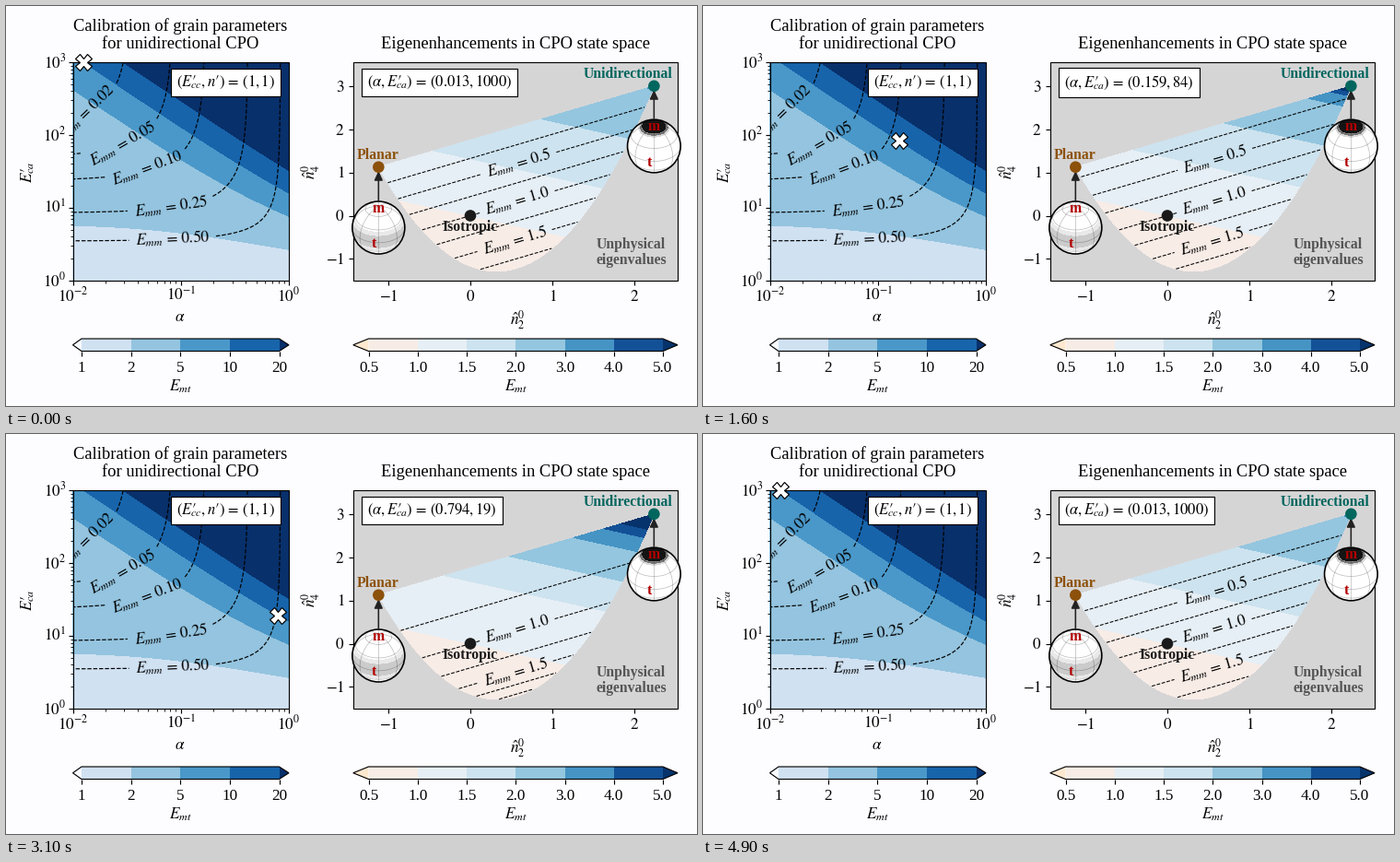
Write a matplotlib script that moves like this. It is 750 by 434 pixels and loops after 5 s.

```python
import numpy as np
import matplotlib.pyplot as plt
from matplotlib.animation import FuncAnimation
from matplotlib.patches import Circle, Polygon, Rectangle

W, H, DPI = 750, 434, 100
PT = 72 / DPI
FS, TITLE, BOLD, INFO = 17.1 * PT, 18.55 * PT, 15.7 * PT, 16.5 * PT
plt.rcParams.update({
    "font.family": "Liberation Serif", "mathtext.fontset": "stix",
    "font.size": FS, "axes.unicode_minus": True,
})

fig = plt.figure(figsize=(W / DPI, H / DPI), dpi=DPI, facecolor="#fdfcfe")
ax = fig.add_axes([0, 0, 1, 1])
ax.set_axis_off()

TOP, BOT = 61, 298
L0, L1 = 72.5, 307
R0, R1 = 376.8, 729
BLUES = ["#f7fbff", "#d0e1f2", "#94c4df", "#4a98c9", "#1764ab", "#08306b"]
STATE = ["#fde8cf", "#f8ece6", "#e6eff5", "#cde3ef", "#94c6df", "#4594c4",
         "#135197", "#06336b"]
EQ = r"\,=\,"
# Full-size prime set above a two-letter subscript.
PRIME = "\\hspace{-0.86}\u2032\\hspace{0.45}"


# ---------- model ----------
def enhancement(q, alpha, e_ca):
    """Mixed Sachs-Taylor enhancement for a mode with basal-shear share q."""
    k = 1 / e_ca - 1
    sachs = (1 + (e_ca - 1) * q) / (1 + 0.4 * (e_ca - 1))
    taylor = (1 + 0.4 * k) / (1 + k * q)
    return (1 - alpha) * sachs + alpha * taylor


def grain_px(log_a, log_e):
    return L0 + (log_a + 2) / 2 * (L1 - L0), BOT - log_e / 3 * (BOT - TOP)


def state_px(n2, n4):
    return 504 + 89.15 * n2, 227.5 - 46.9 * n4


def moments_px(x2, x4):
    """Pixel position of a state with <cos^2> = x2 and <cos^4> = x4."""
    n2 = np.sqrt(5) * (3 * x2 - 1) / 2
    return state_px(n2, 3 * (35 * x4 - 30 * x2 + 3) / 8)


# ---------- drawing helpers ----------
def put(x, y, s, size=FS, ha="center", va="baseline", **kw):
    return ax.text(x, y, s, fontsize=size, ha=ha, va=va, **kw)


def stroke(xs, ys, width=1.14, color="black", **kw):
    return ax.plot(xs, ys, color=color, lw=width * PT, **kw)[0]


def dashed(xs, ys, width, label=None, at=None, half=0, angle=None, clip=None):
    """Dashed line with an inline label centred nearest to `at`."""
    s = np.r_[0, np.cumsum(np.hypot(np.diff(xs), np.diff(ys)))]
    u = np.arange(0, s[-1], 0.5)
    xs, ys = np.interp(u, s, xs), np.interp(u, s, ys)
    parts, out = [slice(None)], []
    if label:
        c = int(np.argmin(np.hypot(xs - at[0], ys - at[1])))
        parts = [slice(0, max(0, c - 2 * half)), slice(c + 2 * half, None)]
        pos = (xs[c], ys[c]) if clip is None else at
        out.append(put(*pos, label, va="center", rotation=angle, zorder=3))
    for p in parts:
        if len(xs[p]) > 1:
            out.append(stroke(xs[p], ys[p], width, ls="--", zorder=2))
    if clip is not None:
        for artist in out:
            artist.set_clip_on(True)
            artist.set_clip_path(clip)
    return out


def frame_box(x0, x1):
    ax.add_patch(Rectangle((x0, TOP), x1 - x0, BOT - TOP, fc="none", ec="black",
                           lw=1.14 * PT, zorder=4))


def x_tick(x, y=BOT, length=5, width=1.14):
    stroke([x, x], [y, y + length], width, solid_capstyle="butt")


def y_tick(x, y, length=5, width=1.14):
    stroke([x - length, x], [y, y], width, solid_capstyle="butt")


def colour_bar(x0, a, b, x1, colors, labels):
    y0, y1 = 361, 374.5
    ym = (y0 + y1) / 2
    edges = np.linspace(a, b, len(labels))
    ax.add_patch(Polygon([(x0, ym), (a, y0), (a, y1)], fc=colors[0], lw=0))
    ax.add_patch(Polygon([(x1, ym), (b, y0), (b, y1)], fc=colors[-1], lw=0))
    for left, right, color in zip(edges, edges[1:], colors[1:]):
        ax.add_patch(Rectangle((left, y0), right - left, y1 - y0, fc=color, lw=0))
    ax.add_patch(Polygon([(x0, ym), (a, y0), (b, y0), (x1, ym), (b, y1), (a, y1)],
                         fc="none", ec="black", lw=1.14 * PT))
    for x, label in zip(edges, labels):
        x_tick(x, y1)
        put(x, 397, label)
    put((x0 + x1) / 2, 418, "$E_{mt}$")


def sphere(cx, cy, r, levels, colors, field):
    tilt = np.radians(35)
    sn, cs = np.sin(tilt), np.cos(tilt)
    g = np.linspace(-1.05, 1.05, 161)
    X, Y = np.meshgrid(g, g)
    sin_lat = Y * cs + np.sqrt(np.clip(1 - X**2 - Y**2, 0, 1)) * sn
    disk = Circle((cx, cy), r, fc="white", ec="none", zorder=5)
    ax.add_patch(disk)
    shade = ax.contourf(cx + r * X, cy - r * Y, field(sin_lat), levels=levels,
                        colors=colors, zorder=5.1)
    shade.set_clip_path(disk)

    def grid_line(lat, lon):
        depth = np.sin(lat) * sn + np.cos(lat) * np.cos(lon) * cs
        x = cx + r * np.cos(lat) * np.sin(lon)
        y = cy - r * (np.sin(lat) * cs - np.cos(lat) * np.cos(lon) * sn)
        stroke(np.where(depth > 0, x, np.nan), y, 0.75, alpha=0.25, zorder=5.2)

    turn = np.linspace(-np.pi, np.pi, 181)
    for lat in np.radians([-30, 0, 30, 60]):
        grid_line(np.full_like(turn, lat), turn)
    for lon in np.radians(np.arange(0, 360, 45)):
        grid_line(turn / 2, np.full_like(turn, lon))
    ax.add_patch(Circle((cx, cy), r, fc="none", ec="black", lw=1.6 * PT, zorder=5.3))
    for dx, dy, s in ((0, -17, "m"), (-5, 22, "t")):
        put(cx + dx, cy + dy, s, BOLD, color="#b30000", weight="bold", zorder=6)


def state_point(x, y, color, r=6.3):
    ax.add_patch(Circle((x, y), r, fc=color, ec="none", zorder=7))


def arrow(x, y0, y1):
    ax.annotate("", (x, y1), (x, y0), zorder=6, arrowprops=dict(
        arrowstyle="-|>,head_length=0.45,head_width=0.21", mutation_scale=13,
        color="#222222", lw=1.6 * PT, shrinkA=0, shrinkB=0))


INFO_BOX = dict(boxstyle="square,pad=0.36", fc="white", ec="black", lw=1.14 * PT)

# ---------- left panel ----------
put(189, 27, "Calibration of grain parameters", TITLE)
put(189, 46, "for unidirectional CPO", TITLE)

log_a, log_e = np.meshgrid(np.linspace(-2, 0, 240), np.linspace(0.001, 3, 240))
e_mt = enhancement(1.0, 10**log_a, 10**log_e)
ax.contourf(*grain_px(log_a, log_e), np.log10(e_mt),
            levels=np.log10([0.5, 1, 2, 5, 10, 20, 1e4]), colors=BLUES, zorder=1)

left_area = Rectangle((L0, TOP), L1 - L0, BOT - TOP, fc="none", ec="none")
ax.add_patch(left_area)
e = np.logspace(0.02, 3, 20000)
sachs, taylor = enhancement(0.0, 0.0, e), enhancement(0.0, 1.0, e)
for level, at, angle in ((0.02, (87, 116), 44), (0.05, (127, 150), 30),
                         (0.10, (154, 176.5), 20.5), (0.25, (179, 218), 8),
                         (0.50, (181, 252.5), 2.5)):
    a = (level - sachs) / (taylor - sachs)
    ok = (a > 0.004) & (a < 1)
    dashed(*grain_px(np.log10(a[ok]), np.log10(e[ok])), 1.2,
           f"$E_{{mm}}{EQ}{level:.2f}$", at, 47, angle, left_area)

frame_box(L0, L1)
for k in range(4):
    y = grain_px(0, k)[1]
    y_tick(L0, y)
    put(65.5, y + 6, f"$10^{{{k}}}$", ha="right")
for k in range(-2, 1):
    x = grain_px(k, 0)[0]
    x_tick(x)
    put(x, 320, f"$10^{{{k}}}$")
for m in np.log10(np.arange(2, 10)):
    for k in range(3):
        y_tick(L0, grain_px(0, k + m)[1], 3, 0.85)
    for k in (-2, -1):
        x_tick(grain_px(k + m, 0)[0], BOT, 3, 0.85)
put(189, 342, r"$\alpha$")
put(24, 180, f"$E_{{ca}}{PRIME}$", va="center", rotation=90)
put(292, 83, rf"$(E_{{cc}}{PRIME},n" "\u2032" rf"){EQ}(1,1)$", INFO, ha="right",
    va="center", bbox=INFO_BOX, zorder=6)
marker, = ax.plot([], [], "X", ms=17.5 * PT, mfc="white", mec="black", mew=1.2 * PT,
                  clip_on=False, zorder=8)

# ---------- right panel ----------
put(553, 46.5, "Eigenenhancements in CPO state space", TITLE)
ax.add_patch(Rectangle((R0, TOP), R1 - R0, BOT - TOP, fc="#d6d5d6", lw=0, zorder=0))
frame_box(R0, R1)
for n in range(-1, 4):
    y = state_px(0, n)[1]
    y_tick(R0, y)
    put(367.5, y + 5.8, f"${n}$", ha="right")
for n in range(-1, 3):
    x = state_px(n, 0)[0]
    x_tick(x)
    put(x, 320, f"${n}$")
put(555, 346, r"$\hat{n}_2^0$")
put(331, 180, r"$\hat{n}_4^0$", va="center", rotation=90)

brown, teal, dark = "#8c510a", "#01665e", "#1a1a1a"
xp, yp = state_px(-np.sqrt(5) / 2, 1.125)
xu, yu = state_px(np.sqrt(5), 3)
xi, yi = state_px(0, 0)
sphere(xp, 240.5, 28.5, [0, 0.3, 0.42], ["#cbcbcb", "#e9e9e9"], np.abs)
sphere(xu, 152, 28.8, [0.82, 0.86, 0.9, 1.1], ["#d9d9d9", "#858585", "#151515"],
       lambda s: s)
arrow(xp, 211, 179)
arrow(xu, 122, 91)
state_point(xp, yp, brown)
state_point(xu, yu, teal)
state_point(xi, yi, dark)
for x, y, s, color in ((404, 166, "Planar", brown), (675, 77.5, "Unidirectional", teal),
                       (504, 244, "Isotropic", dark), (678.5, 263, "Unphysical", "#555555"),
                       (678.5, 279.5, "eigenvalues", "#555555")):
    put(x, y, s, BOLD, color=color, weight="bold", zorder=7)
info = put(392, 83, "", INFO, ha="left", va="center", bbox=INFO_BOX, zorder=6)

colour_bar(L0, 82, 296.5, L1, BLUES, ["1", "2", "5", "10", "20"])
colour_bar(R0, 393.5, 713, R1, STATE,
           ["0.5", "1.0", "1.5", "2.0", "3.0", "4.0", "5.0"])

# Mesh of the physically allowed states, between a parabola and its chord.
mx, ms = np.meshgrid(np.linspace(0, 1, 240), np.linspace(0, 1, 80))
mx4 = mx**2 + ms * (mx - mx**2)
mesh = moments_px(mx, mx4)
q_shear = 0.5 - 1.5 * mx + 2 * mx4
slope = np.degrees(np.arctan2(yp - yu, xu - xp))
LABEL_AT = {0.5: (557, 170), 1.0: (555, 212), 1.5: (552, 253.5)}

# Grain parameters along the E_mt = 10 path.
LOG_A = np.linspace(-1.8999, 0, 20)
PATH_LOG_A = LOG_A[[0, 3, 8, 11, 15, 18, 19]]
PATH_LOG_E = np.log10([1000, 500, 159, 84, 35, 19, 16])
moving = []


def update(i):
    while moving:
        moving.pop().remove()
    la = LOG_A[min(max(i - 5, 0), 19, 49 - i)]
    le = np.interp(la, PATH_LOG_A, PATH_LOG_E)
    alpha, e_ca = 10**la, 10**le

    q = 1 - np.r_[np.linspace(1, 0.1, 1000), np.geomspace(0.0999, 1e-7, 1500), 0]
    cuts = np.interp([1, 1.5, 2, 3, 4, 5], enhancement(q, alpha, e_ca), q)
    moving.append(ax.contourf(*mesh, q_shear, levels=[0, *cuts, 1.01],
                              colors=STATE[1:], zorder=1))

    q = np.linspace(0, 0.75, 3000)
    e_mm = enhancement(q, alpha, e_ca)
    for level in np.arange(0.25, 2.5, 0.25):
        if not e_mm[0] < level < e_mm[-1]:
            continue
        ql = np.interp(level, e_mm, q)
        root = np.sqrt(max(0, 1 - 4 * ql / 3))
        ends = np.array([1 - root, 1 + root]) / 2
        xs, ys = moments_px(ends, ends - ql / 3)
        at = LABEL_AT.get(level)
        label = f"$E_{{mm}}{EQ}{level:.1f}$" if at else None
        moving.extend(dashed(xs, ys, 1.05, label, at, 42, slope))

    px, py = grain_px(la, le)
    marker.set_data([px], [py])
    info.set_text(rf"$(\alpha,E_{{ca}}{PRIME}){EQ}({alpha:.3f},{e_ca:.0f})$")
    return [marker, info]


ax.set_xlim(0, W)
ax.set_ylim(H, 0)
anim = FuncAnimation(fig, update, frames=50, interval=100, repeat=True,
                     repeat_delay=0, blit=False)
plt.show()
```
